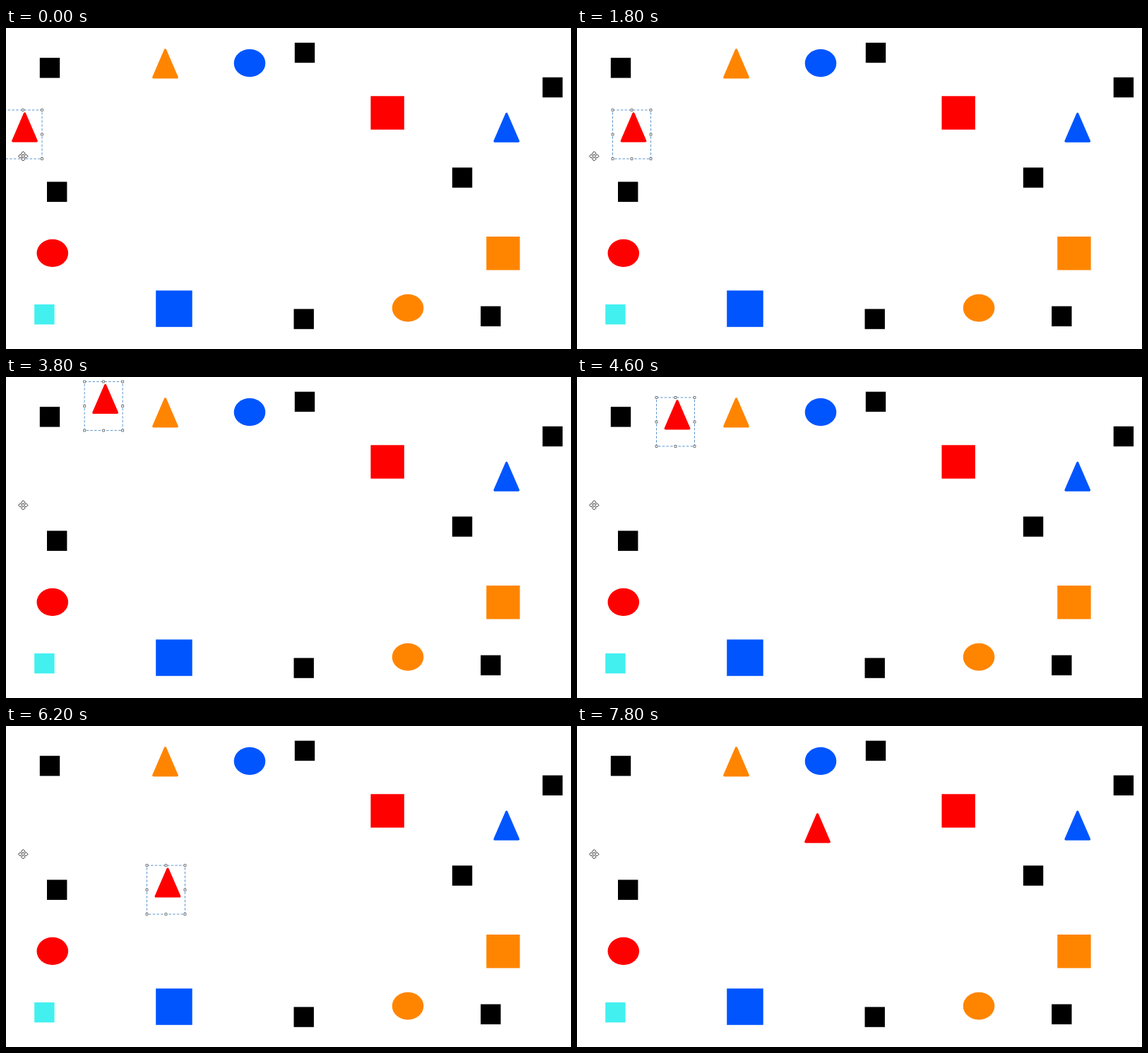
An HTML page with a canvas that plays this animation: 800x454 px, repeating every 8 s.

```html
<!DOCTYPE html>
<html lang="en">
<head>
<meta charset="utf-8">
<title>Moving triangle</title>
<style>
  html, body { margin: 0; width: 100%; height: 100%; overflow: hidden; background: #fff; }
  canvas { display: block; }
</style>
</head>
<body>
<canvas id="stage" width="800" height="454"></canvas>
<script>
const ctx = document.getElementById('stage').getContext('2d');
const LOOP = 8000, STEP = 200, SELECTED_UNTIL = 6800;
const RED = '#ff0000', ORANGE = '#ff8500', BLUE = '#0055ff', CYAN = '#43f0f0', BLACK = '#000';
const SMALL = 28.4, LARGE = 47.4;

// Waypoints of the red triangle's tip
const route = [
  { t: 800, x: 26.5, y: 120 },
  { t: 1800, x: 80, y: 120 },
  { t: 3000, x: 121, y: 70 },
  { t: 4000, x: 142, y: 5.5 },
  { t: 4600, x: 142, y: 33 },
  { t: 5400, x: 196, y: 113.5 },
  { t: 5600, x: 204, y: 143 },
  { t: 6600, x: 246, y: 218 },
  { t: 7000, x: 263.5, y: 204.5 },
  { t: 7800, x: 340.5, y: 124 },
];

// Smooth travel between waypoints, without overshoot at the turns
function along(axis, time) {
  const last = route.length - 1;
  const t = Math.min(Math.max(time, route[0].t), route[last].t);
  const i = Math.max(0, route.findIndex(p => p.t >= t) - 1);
  const slope = j => (route[j + 1][axis] - route[j][axis]) / (route[j + 1].t - route[j].t);
  const speed = j => {
    const a = slope(Math.max(j - 1, 0)), b = slope(Math.min(j, last - 1));
    return a * b > 0 ? 2 * a * b / (a + b) : 0;
  };
  const from = route[i], to = route[i + 1], span = to.t - from.t;
  const u = (t - from.t) / span, w = 1 - u;
  return from[axis] * w * w * (1 + 2 * u) + to[axis] * u * u * (1 + 2 * w)
       + span * u * w * (speed(i) * w - speed(i + 1) * u);
}

function square(x, y, size, color) {
  ctx.fillStyle = color;
  ctx.fillRect(x, y, size, size);
}

function oval(x, y, color) {
  ctx.fillStyle = color;
  ctx.beginPath();
  ctx.ellipse(x, y, 22.3, 19.6, 0, 0, Math.PI * 2);
  ctx.fill();
}

function polygon(...points) {
  ctx.beginPath();
  for (const [x, y] of points) ctx.lineTo(x, y);
  ctx.closePath();
  ctx.fill();
  ctx.stroke();
}

function triangle(x, y, color) {
  ctx.fillStyle = ctx.strokeStyle = color;
  ctx.lineWidth = 3.2;
  ctx.lineJoin = 'round';
  polygon([x, y + 1], [x + 16.8, y + 39.8], [x - 16.8, y + 39.8]);
}

function selection(tipX, tipY) {
  const w = 54, h = 69, x = tipX - 29.5, y = tipY - 4;
  ctx.lineWidth = 1;
  ctx.strokeStyle = '#5b97cf';
  ctx.setLineDash([3.5, 2.2]);
  ctx.strokeRect(x, y, w, h);
  ctx.setLineDash([]);
  ctx.strokeStyle = '#777';
  for (let i = 0; i < 9; i++) {
    if (i === 4) continue;
    const hx = x + (i % 3) * w / 2 - 1.5, hy = y + Math.floor(i / 3) * h / 2 - 1.5;
    square(hx, hy, 3, '#fff');
    ctx.strokeRect(hx, hy, 3, 3);
  }
}

function moveCursor(x, y) {
  const r = 2.7;
  ctx.lineWidth = 1;
  ctx.strokeStyle = '#2b2b2b';
  ctx.fillStyle = '#fff';
  for (let i = 0; i < 4; i++) {
    const cx = x + 4 * Math.cos(i * Math.PI / 2), cy = y + 4 * Math.sin(i * Math.PI / 2);
    polygon([cx, cy - r], [cx + r, cy], [cx, cy + r], [cx - r, cy]);
  }
}

function drawBackground() {
  ctx.fillStyle = '#fff';
  ctx.fillRect(0, 0, 800, 454);

  square(47.8, 42.2, SMALL, BLACK);
  square(408.8, 20.8, SMALL, BLACK);
  square(759.7, 69.8, SMALL, BLACK);
  square(58, 217.5, SMALL, BLACK);
  square(631.8, 197.4, SMALL, BLACK);
  square(407.5, 397.4, SMALL, BLACK);
  square(672.1, 393.5, SMALL, BLACK);
  square(40.2, 390.9, SMALL, CYAN);

  square(516.4, 96.3, LARGE, RED);
  square(680.2, 295, LARGE, ORANGE);
  square(212.2, 371.3, 51.5, BLUE);

  oval(345, 49.7, BLUE);
  oval(65.8, 318.4, RED);
  oval(569, 396, ORANGE);

  triangle(225.5, 30, ORANGE);
  triangle(708.7, 120.3, BLUE);
}

function draw(now) {
  const t = Math.floor((now % LOOP) / STEP) * STEP;
  const x = along('x', t), y = along('y', t);
  drawBackground();
  triangle(x, y, RED);
  if (t < SELECTED_UNTIL) selection(x, y);
  moveCursor(24.3, 181.3);
}

function tick() {
  draw(performance.now());
  requestAnimationFrame(tick);
}
tick();
</script>
</body>
</html>
```
